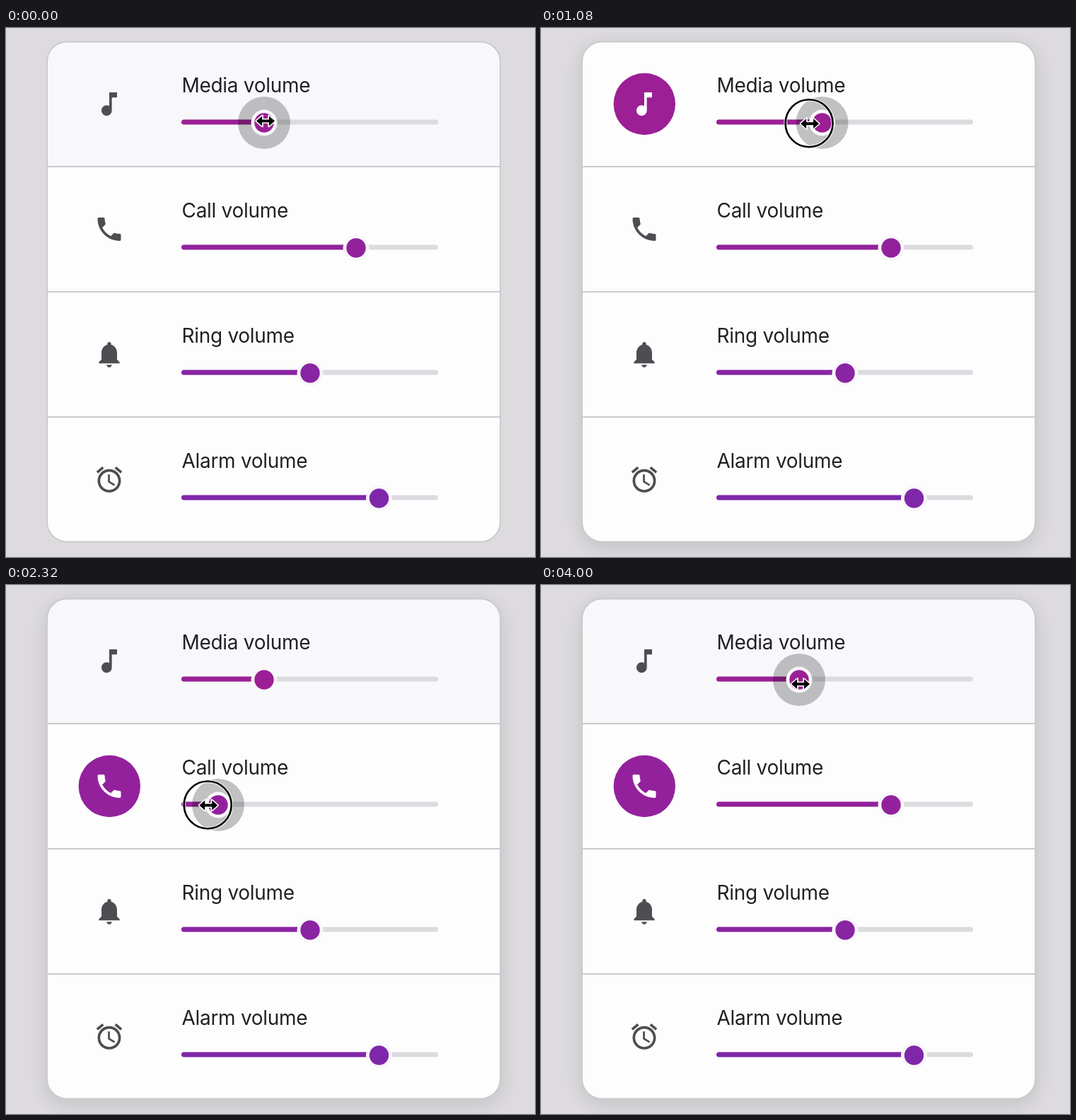
An HTML page that plays this animation: 748 by 748 pixels, repeating every 4040 ms.

```html
<!DOCTYPE html>
<html lang="en">
<head>
<meta charset="utf-8">
<title>Volume sliders</title>
<style>
html, body { margin: 0; width: 100%; height: 100%; overflow: hidden; background: #dddbde; }
svg { display: block; width: 100%; height: 100%; }
text { font: 28px Inter, "Open Sans", sans-serif; letter-spacing: -.3px; fill: #222024; }
.track { stroke-width: 7; stroke-linecap: round; }
#shadow { filter: blur(14px); }
</style>
</head>
<body>
<svg viewBox="0 0 748 748">
  <clipPath id="clip"><rect x="58" y="19.5" width="641" height="707" rx="28"/></clipPath>
  <rect id="shadow" x="58" y="26" width="641" height="707" rx="28" fill="#000"/>
  <rect x="58" y="19.5" width="641" height="707" rx="28" fill="#f8f7fa"/>
  <g id="rows" clip-path="url(#clip)"></g>
  <path d="M58 196H699M58 373H699M58 550H699" stroke="#cccace" stroke-width="2"/>
  <rect x="58" y="19.5" width="641" height="707" rx="28" fill="none" stroke="#cccace" stroke-width="2"/>
  <g id="ring" fill="none">
    <circle stroke="#fff" stroke-opacity=".7" stroke-width="5"/>
    <circle stroke="#000" stroke-width="2.6"/>
  </g>
  <g id="cursor">
    <path d="M-4-9V9M4-9V9" stroke="#fff" stroke-opacity=".8" stroke-width="1.5"/>
    <path d="M-13 0L-5-7V-2H5V-7L13 0L5 7V2H-5V7Z" stroke="#fff" stroke-width="3" stroke-linejoin="round" paint-order="stroke"/>
  </g>
</svg>
<script>
const LOOP = 4040, STEP = 40, LAG = 40;
const MIN_X = 267.5, NOTCH = 32.5, PITCH = 177, THUMB_Y = 134;

const rowData = [
  ['Media volume', '#9c1f95', 3, 'M12 3v10.55c-.59-.34-1.27-.55-2-.55-2.21 0-4 1.79-4 4s1.79 4 4 4 4-1.79 4-4V7h4V3h-6z'],
  ['Call volume', '#93219c', 7, 'M6.62 10.79c1.44 2.83 3.76 5.14 6.59 6.59l2.2-2.2c.27-.27.67-.36 1.02-.24 1.12.37 2.33.57 3.57.57.55 0 1 .45 1 1V20c0 .55-.45 1-1 1-9.39 0-17-7.61-17-17 0-.55.45-1 1-1h3.5c.55 0 1 .45 1 1 0 1.25.2 2.45.57 3.57.11.35.03.74-.25 1.02l-2.2 2.2z'],
  ['Ring volume', '#8924a3', 5, 'M12 22c1.1 0 2-.9 2-2h-4c0 1.1.89 2 2 2zm6-6v-5c0-3.07-1.64-5.64-4.5-6.32V4c0-.83-.67-1.5-1.5-1.5s-1.5.67-1.5 1.5v.68C7.63 5.36 6 7.92 6 11v5l-2 2v1h16v-1l-2-2z'],
  ['Alarm volume', '#7f27aa', 8, 'M22 5.72l-4.6-3.86-1.29 1.53 4.6 3.86L22 5.72zM7.88 3.39L6.6 1.86 2 5.71l1.29 1.53 4.59-3.85zM12.5 8H11v6l4.75 2.85.75-1.23-4-2.37V8zM12 4c-4.97 0-9 4.03-9 9s4.02 9 9 9c4.97 0 9-4.03 9-9s-4.03-9-9-9zm0 16c-3.87 0-7-3.13-7-7s3.13-7 7-7 7 3.13 7 7-3.13 7-7 7z']
];

// Pointer stops: time, x, y
const stops = [
  [0, 366, 131], [120, 368, 131], [635, 571, 128], [660, 571, 128],
  [1140, 370.5, 135], [1420, 370.5, 135], [1950, 490, 311], [1980, 490, 311],
  [2380, 272, 311], [2480, 272, 311], [3060, 510, 311], [3400, 510, 311],
  [3680, 470, 300], [4020, 365, 138]
];

// Each drag: row index, press time, release time
const drags = [[0, 120, 1160], [1, 1960, 3160]];

const $ = id => document.getElementById(id);
const clamp = u => Math.max(0, Math.min(1, u));
const ramp = (t, from, to) => clamp((t - from) / (to - from));
const set = (el, attrs) => { for (const k in attrs) el.setAttribute(k, attrs[k]); };

$('rows').innerHTML = rowData.map(([label, color, , icon], i) => `
  <g transform="translate(0 ${i * PITCH})">
    <rect class="bg" x="58" y="19" width="641" height="177" fill="#fefdfe"/>
    <circle class="badge" cx="146.3" cy="107.5"/>
    <path class="icon" d="${icon}" transform="translate(124 85.5) scale(1.833)"/>
    <text x="248.5" y="91">${label}</text>
    <path class="track" d="M251.5 133H607.5" stroke="#dddbdf"/>
    <path class="track fill" stroke="${color}"/>
    <g class="thumb">
      <circle class="halo" r="37"/>
      <circle class="gap" r="18.5"/>
      <circle r="13.7" fill="${color}"/>
    </g>
  </g>`).join('');

const rows = [...$('rows').children].map(g => {
  const parts = {};
  for (const name of ['bg', 'badge', 'icon', 'fill', 'thumb', 'halo', 'gap'])
    parts[name] = g.querySelector('.' + name);
  return parts;
});

function pointer(t) {
  const n = stops.findIndex(s => s[0] > t);
  if (n < 0) return stops.at(-1).slice(1);
  const [a, b] = [stops[n - 1], stops[n]];
  const u = ramp(t, a[0], b[0]), e = u * u * (3 - 2 * u);
  return [1, 2].map(k => a[k] + (b[k] - a[k]) * e);
}

function valueAt(i, t) {
  const drag = drags.find(d => d[0] === i);
  if (!drag || t <= drag[1]) return rowData[i][2];
  const x = pointer(Math.max(drag[1], Math.min(t - LAG, drag[2])))[0];
  return Math.round((x - MIN_X) / NOTCH);
}

function drawRow(row, i, t, px, py) {
  const drag = drags.find(d => d[0] === i);
  const start = drag ? drag[1] : Infinity;
  const end = i === 0 ? drags[1][1] : Infinity;
  const active = t > start && t <= end;
  const white = ramp(t, start + 40, start + 200) * (1 - ramp(t, end + 40, end + 200));
  const x = MIN_X + NOTCH * valueAt(i, t);
  const pressed = drag && t >= start && t <= drag[2];
  const distance = Math.hypot(px - x, py - THUMB_Y - i * PITCH);

  set(row.bg, { opacity: white });
  set(row.badge, {
    r: 43.7 * (1 - (1 - ramp(t, start, start + 80)) ** 2.3),
    fill: active ? rowData[i][1] : '#f8f7fa',
    opacity: active || white ? 1 : 0
  });
  set(row.icon, { fill: active ? '#fff' : '#4f4d51' });
  set(row.fill, { d: `M251.5 133H${Math.max(252, x - 10)}` });
  set(row.thumb, { transform: `translate(${x} ${THUMB_Y})` });
  set(row.halo, { 'fill-opacity': .24 * (pressed ? 1 : clamp((24 - distance) / 4)) });
  set(row.gap, { fill: white > .5 ? '#fefdfe' : '#f8f7fa' });
}

function draw(now) {
  const t = Math.floor(now % LOOP / STEP) * STEP;
  const [px, py] = pointer(t);
  rows.forEach((row, i) => drawRow(row, i, t, px, py));
  $('shadow').setAttribute('opacity', .13 * ramp(t, 120, 320));

  const shown = Math.max(...drags.map(([, a, b]) =>
    ramp(t, a - 40, a + 40) * (1 - ramp(t, b - 20, b + 80))));
  set($('ring'), { transform: `translate(${px} ${py})`, opacity: shown });
  for (const c of $('ring').children) c.setAttribute('r', 33.5 + 4 * (1 - shown));
  $('cursor').setAttribute('transform', `translate(${px + 1} ${py + .5})`);
}

const origin = performance.now();
function tick() {
  draw(performance.now() - origin);
  requestAnimationFrame(tick);
}
tick();
</script>
</body>
</html>
```
